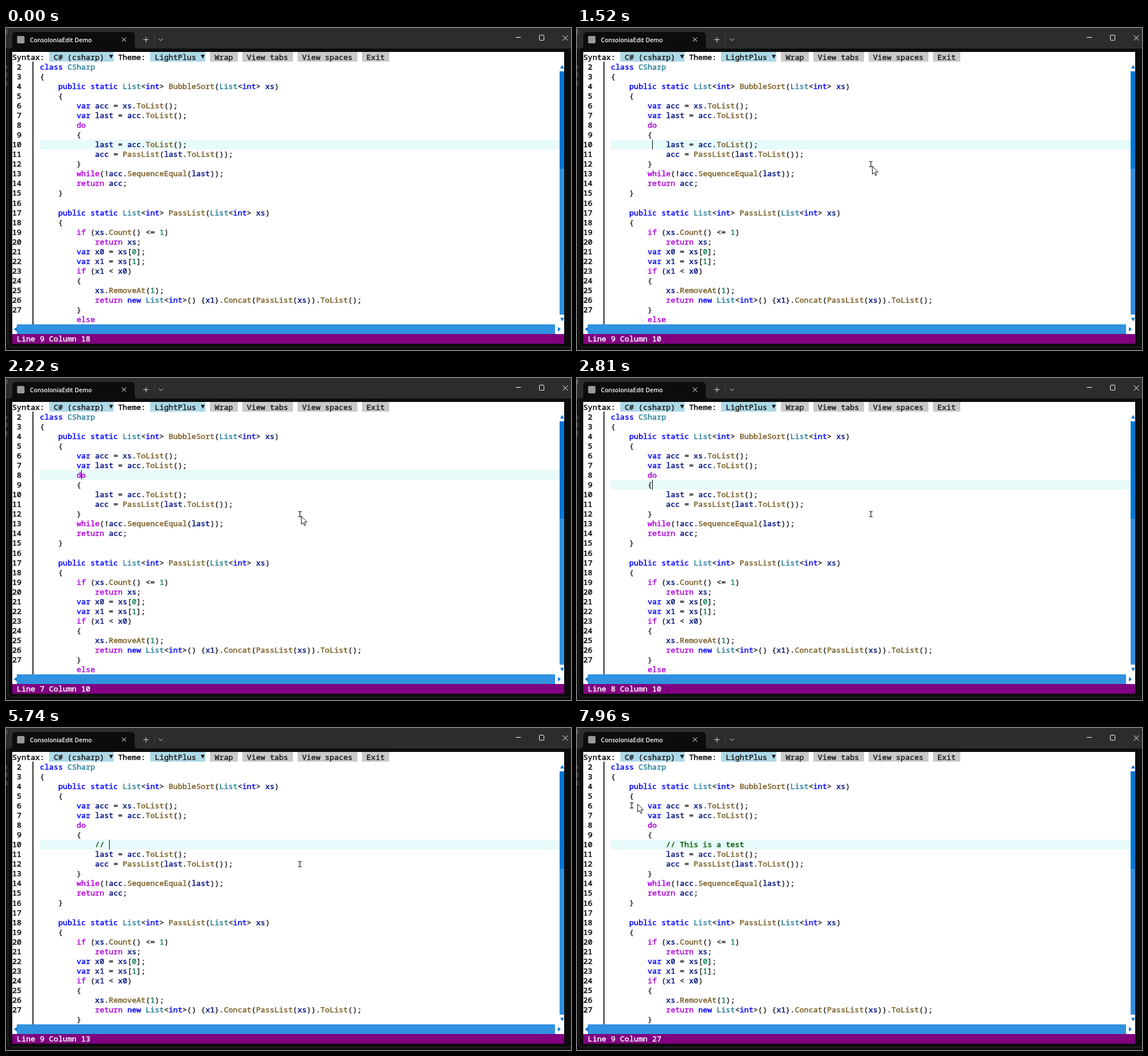
Write an HTML page that moves like this. It is 992x565 px and loops after 8000 ms.

```html
<!DOCTYPE html>
<html lang="en">
<head>
<meta charset="utf-8">
<title>Terminal editor</title>
<style>
html, body { margin: 0; width: 100%; height: 100%; overflow: hidden; background: #0c0c0c; }
svg { display: block; }
.mono { font: 500 13.45px "Noto Sans Mono", "DejaVu Sans Mono", monospace; font-variant-ligatures: none; }
.mono text { stroke-width: .45px; }
.title { font: 600 10.5px "Open Sans", "Noto Sans", sans-serif; }
</style>
</head>
<body>
<svg id="stage" width="992" height="565" viewBox="0 0 992 565">
  <defs>
    <pattern id="shade" width="2" height="2" patternUnits="userSpaceOnUse">
      <path d="M0 0h2v2h-2z" fill="#0078d7"/>
      <path d="M0 0h1v1h-1zM1 1h1v1h-1z" fill="#62abe6"/>
    </pattern>
  </defs>
  <rect width="992" height="565" fill="#0c0c0c"/>
  <rect width="992" height="36" fill="#2b2c2e"/>
  <path d="M3.5 36V552q0 8 8 8H992" fill="none" stroke="#303030"/>
  <path d="M0 4h3M1.5 4v7M1 66v6M1 78v8M1 93v8" stroke="#777" fill="none"/>
  <path d="M5 36q6 0 6-6V14q0-7 7-7H219q7 0 7 7V30q0 6 6 6z" fill="#0c0c0c"/>
  <rect x="19.5" y="14" width="13" height="13" rx="2" fill="#9a9a9a"/>
  <text class="title" x="42" y="25" fill="#fff">ConsoloniaEdit Demo</text>
  <g fill="none" stroke="#fff">
    <path d="M203.5 16.5l7.5 7.5M211 16.5l-7.5 7.5"/>
    <path d="M241 20.5h9.5M245.7 16v9.5M268 18.5l3.7 3.7l3.7-3.7" stroke="#ddd"/>
    <path d="M260.5 11v19" stroke="#444"/>
    <path d="M895 16.5h9M977.5 13l9 9M986.5 13l-9 9"/>
    <rect x="936.5" y="12.5" width="8" height="9" rx="1"/>
  </g>
  <rect x="11" y="42" width="969" height="512" fill="#fff"/>
  <rect id="band" x="59" width="913" height="17" fill="#e7fbfb"/>
  <g id="screen" class="mono"></g>
  <path id="caret" d="M0 0h1v17h-1z"/>
  <path id="beam" d="M-3-4.5h2.2L0-4 .8-4.5H3M-3 4.5h2.2L0 4 .8 4.5H3M0-4V4" fill="none" stroke="#111" stroke-width="1.2"/>
  <path id="arrow" d="M.5.5V14.5L3.7 11.6 6 17 8.2 16 6 10.9H10.5Z" fill="#fff" stroke="#111"/>
</svg>
<script>
const LOOP = 8000, COL = 969 / 120, ROW = 512 / 30, BLINK = 500;
const X = col => Math.round(11 + col * COL);
const Y = row => Math.round(42 + row * ROW);
const $ = id => document.getElementById(id);
const screen = $("screen");

const SOURCE = `class CSharp
{
    public static List<int> BubbleSort(List<int> xs)
    {
        var acc = xs.ToList();
        var last = acc.ToList();
        do
        {
            last = acc.ToList();
            acc = PassList(last.ToList());
        }
        while(!acc.SequenceEqual(last));
        return acc;
    }

    public static List<int> PassList(List<int> xs)
    {
        if (xs.Count() <= 1)
            return xs;
        var x0 = xs[0];
        var x1 = xs[1];
        if (x1 < x0)
        {
            xs.RemoveAt(1);
            return new List<int>() {x1}.Concat(PassList(xs)).ToList();
        }
        else`.split("\n");
const COMMENT = "// This is a test";

function add(tag, attrs, parent = screen) {
  const node = document.createElementNS("http://www.w3.org/2000/svg", tag);
  for (const key in attrs) node.setAttribute(key, attrs[key]);
  parent.append(node);
  return node;
}

function write(text, col, row, color = "#000", parent = screen) {
  const y = Math.round(55.5 + row * ROW);
  const node = add("text", { x: 11 + col * COL, y, fill: color, stroke: color }, parent);
  node.textContent = text;
  return node;
}

function box(c0, c1, r0, r1, fill) {
  add("rect", { x: X(c0), y: Y(r0), width: X(c1) - X(c0), height: Y(r1) - Y(r0), fill });
}

function colorOf(token, rest) {
  if (/^(class|public|static|int|var|new)$/.test(token)) return "#0000ff";
  if (/^(do|while|return|if|else)$/.test(token)) return "#af00db";
  if (/^(List|CSharp)$/.test(token)) return "#267f99";
  if (/^\d/.test(token)) return "#098658";
  if (/^\w/.test(token)) return rest[0] === "(" ? "#795e26" : "#001080";
  return "#2b2b2b";
}

function writeCode(line, row, parent) {
  for (const m of line.matchAll(/\w+|[^\w\s]+/g))
    write(m[0], 6 + m.index, row, colorOf(m[0], line.slice(m.index + m[0].length)), parent);
}

// Toolbar: controls follow each other with one free column between
function control(label, col, isCombo) {
  const width = label.length + (isCombo ? 3 : 2);
  box(col, col + width, 0, 1, isCombo ? "#add8e6" : "#c9c9c9");
  write(label, col + 1, 0, "#1c1c1c");
  if (isCombo) add("path", { d: `M${X(col + width - 1)} 47h7l-3.5 7z`, fill: "#1c1c1c" });
  return col + width + 1;
}
write("Syntax:", 0, 0);
const themeCol = control("C# (csharp)", 8, true);
write("Theme:", themeCol, 0);
["LightPlus", "Wrap", "View tabs", "View spaces", "Exit"]
  .reduce((col, label, i) => control(label, col, i === 0), themeCol + 7);

// Editor
for (let n = 2; n <= 27; n++) write(n, n < 10 ? 1 : 0, n - 1);
add("rect", { x: 46.5, y: Y(1), width: 1.7, height: Y(28) - Y(1) });
const tail = add("g", {});
SOURCE.forEach((line, i) => writeCode(line, i + 1, i < 8 ? screen : tail));
const comment = write("", 18, 9, "#005a00");

// Scroll bars
const blue = "#0078d7";
box(119, 120, 2, 12, blue);
box(119, 120, 12, 27, "url(#shade)");
box(1, 118, 28, 29, "url(#shade)");
for (const d of ["M973 71h7l-3.5-6z", "M973 508.5h7l-3.5 6z",
  "M19 524.5v8l-5-4z", "M969 524.5v8l5-4z"]) add("path", { d, fill: blue });

// Status bar
box(0, 120, 29, 30, "#800080");
const status = write("", 1, 29, "#fff");

// Evenly spaced key presses, each moving the line or typing characters
const BURSTS = [
  { start: 300, gap: 200, presses: 2, line: 1 },
  { start: 1300, gap: 170, presses: 5, line: -1 },
  { start: 2220, gap: 200, presses: 2, line: 1 },
  { start: 2910, gap: 1, presses: 1, line: 1 },
  { start: 4520, gap: 300, presses: 2, chars: 1 },
  { start: 5640, gap: 1, presses: 1, chars: 1 },
  { start: 5838, gap: 94, presses: 14, chars: 1 },
];
const ENTER = 2910;

function keyboard(t) {
  const state = { line: 9, count: 0, last: -BLINK };
  for (const { start, gap, presses, line = 0, chars = 0 } of BURSTS) {
    if (t < start) break;
    const done = Math.min(presses, Math.floor((t - start) / gap) + 1);
    state.line += done * line;
    state.count += done * chars;
    state.last = start + (done - 1) * gap;
  }
  return state;
}

// Mouse stops: time, x, y
const PATH = [[100, 960, 40], [500, 500, 256], [1300, 500, 256], [1420, 516, 239],
  [7400, 516, 239], [7560, 209, 391], [7840, 16, 190], [7960, 96, 136], [8020, 104, 130]];

function mouse(t) {
  const i = PATH.findIndex(stop => stop[0] > t);
  if (i < 1) return i ? PATH.at(-1).slice(1) : [];
  const [t0, x0, y0] = PATH[i - 1], [t1, x1, y1] = PATH[i];
  const k = (t - t0) / (t1 - t0);
  return [x0 + (x1 - x0) * k, y0 + (y1 - y0) * k];
}

function place(node, x, y) {
  node.style.display = x === undefined ? "none" : "";
  if (x !== undefined) node.setAttribute("transform", `translate(${x} ${y})`);
}

function render(t) {
  const { line, count, last } = keyboard(t);
  const inserted = t >= ENTER;
  const index = inserted ? 12 + count : t >= 500 ? 9 : 17;
  const column = inserted ? 10 + count : index + 1;
  const caretOn = Math.floor((t - last) / BLINK) % 2 === 0 && t >= 300;

  $("band").setAttribute("y", Y(line));
  tail.setAttribute("transform", `translate(0 ${inserted ? 17 : 0})`);
  comment.textContent = COMMENT.slice(0, count);
  status.textContent = `Line ${line} Column ${column}`;
  place($("caret"), caretOn ? X(6 + index) : undefined, Y(line));

  // The pointer runs slightly ahead of the beam and hides around key presses
  const hidden = (t >= 2610 && t < 3720) || (t >= 4620 && t < 7400);
  const [px, py] = mouse(t + 60);
  place($("beam"), ...mouse(t));
  place($("arrow"), hidden || px === undefined ? undefined : px + 2, py + 3);
}

function tick() {
  render(performance.now() % LOOP);
  requestAnimationFrame(tick);
}
tick();
</script>
</body>
</html>
```
